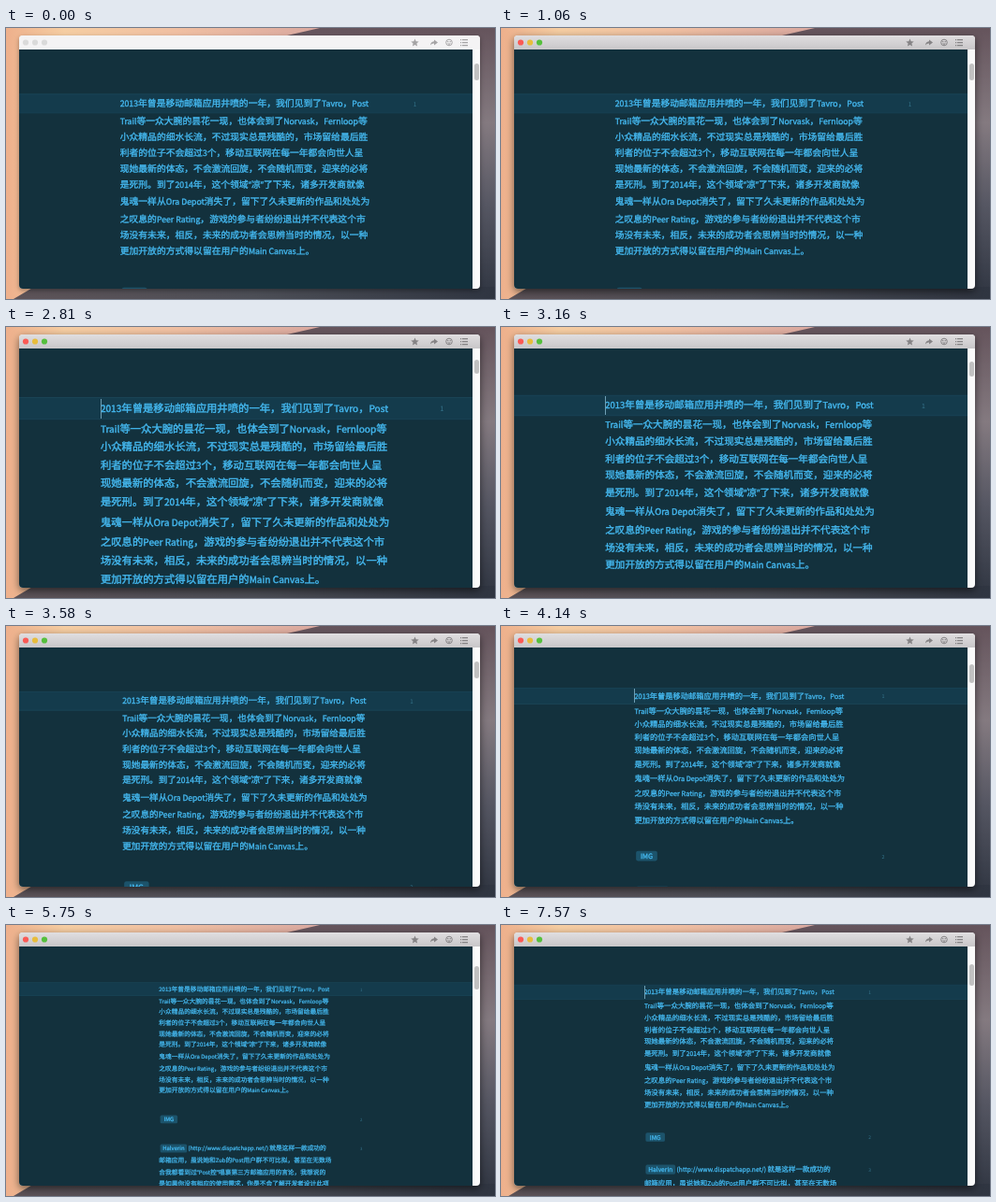
Recreate the animation shown at these times as an HTML page. Size 522 by 290 pixels, loop 8000 ms.

```html
<!DOCTYPE html>
<html lang="zh-CN">
<head>
<meta charset="utf-8">
<title>Text zoom</title>
<style>
html, body { margin: 0; width: 100%; height: 100%; overflow: hidden; background: #e9b993; }
#stage { position: absolute; left: 0; top: 0; width: 522px; height: 290px; overflow: hidden; }
#stage > svg { position: absolute; left: 0; top: 0; }
#win { position: absolute; left: 14px; top: 8px; width: 492px; height: 271px; border-radius: 4px;
  background: #fafafa; box-shadow: 0 3px 9px rgba(0,0,0,.55); }
#bar { position: absolute; left: 0; top: 0; width: 492px; height: 15px; border-radius: 4px 4px 0 0;
  background: linear-gradient(#e0dee0, #c8c6c8); }
#bar svg { position: absolute; left: 0; top: 0; }
.idle #win { box-shadow: 0 2px 5px rgba(0,0,0,.35); }
.idle #bar { background: #f4f3f4; }
.idle .light { fill: #dadada; }
.idle .icons { opacity: .7; }
#page { position: absolute; left: 0; top: 15px; width: 484px; height: 256px; overflow: hidden;
  background: #13313d; border-radius: 0 0 0 4px; }
#zoom { position: absolute; left: 240.2px; top: 19px; width: 0; height: 0; transform-origin: 0 0;
  font: 500 20px/40px "Noto Sans CJK SC", "Noto Sans CJK", sans-serif; color: #45baf2;
  text-rendering: geometricPrecision; }
#band { position: absolute; left: -800px; width: 1600px; top: 58.4px; height: 42.6px;
  background: #143b4c; box-shadow: inset 0 0 0 1.5px #1b4658; }
.line { position: absolute; left: -270px; white-space: pre; -webkit-text-stroke: .7px; }
.line span { font-size: 17.8px; line-height: 0; }
.line i { font: 500 19px/0 "Open Sans", sans-serif; }
.line b { display: inline-block; margin-left: 4px; padding: 0 7.5px; border-radius: 5px;
  font-weight: 500; line-height: 26.4px; background: #1c536b; }
.num { position: absolute; left: 369px; font-size: 13px; color: #35748c; }
#caret { position: absolute; width: 1px; background: #6f9fb4; }
#thumb { position: absolute; left: 486px; width: 5px; border-radius: 2.5px; background: #c1c1c1; }
</style>
</head>
<body>
<div id="stage">
  <svg width="522" height="290">
    <defs>
      <linearGradient id="sky">
        <stop offset="0" stop-color="#eeb08c"/><stop offset=".12" stop-color="#f5cda2"/>
        <stop offset=".35" stop-color="#f0bfa2"/><stop offset=".65" stop-color="#d9a8a0"/>
      </linearGradient>
      <linearGradient id="rock" x2="0" y2="1">
        <stop offset="0" stop-color="#65545c"/><stop offset=".35" stop-color="#847a80"/>
        <stop offset=".65" stop-color="#565763"/><stop offset="1" stop-color="#2f3541"/>
      </linearGradient>
      <linearGradient id="hills">
        <stop offset="0" stop-color="#5d5358"/><stop offset=".5" stop-color="#4c4e56"/>
        <stop offset="1" stop-color="#2f3541"/>
      </linearGradient>
    </defs>
    <path d="M0 0H522V290H0z" fill="url(#sky)"/>
    <path d="M300 8L335 0H522V290H420z" fill="url(#rock)"/>
    <path d="M8 290L30 277H522V290z" fill="url(#hills)"/>
  </svg>
  <div id="win">
    <div id="bar">
      <svg width="492" height="15">
        <g class="lights">
          <circle class="light" cx="7" cy="7.5" r="3.1" fill="#fa5a55"/>
          <circle class="light" cx="17" cy="7.5" r="3.1" fill="#e8bd3c"/>
          <circle class="light" cx="27" cy="7.5" r="3.1" fill="#55c03d"/>
        </g>
        <g class="icons" fill="#858385">
          <path d="M422.500 3.500l1.200 2.800 3 .3-2.300 2 .7 3-2.600-1.600-2.600 1.600.7-3-2.300-2 3-.3z"/>
          <path d="M443 4.500l4 3-4 3v-1.900q-2.500-.2-4 1.900.3-4 4-4.300z"/>
          <circle cx="459" cy="7.500" r="3.300" fill="none" stroke="#858385"/>
          <path d="M457.200 6h1.200v1.200h-1.200zm2.400 0h1.200v1.200h-1.200zM457 8.500h4l-2 1.600z"/>
          <path d="M471 4h1.200v1.200H471zm2 0h6v1.200h-6zM471 7h1.200v1.200H471zm2 0h6v1.200h-6zM471 10h1.200v1.200H471zm2 0h6v1.200h-6z"/>
        </g>
      </svg>
    </div>
    <div id="page">
      <div id="zoom"><div id="band"></div></div>
      <div id="caret"></div>
    </div>
    <div id="thumb"></div>
  </div>
</div>
<script>
const $ = id => document.getElementById(id);
const MID = 254.2, TOP = 42;                          // fixed point of the zoom on the stage
const FIRST = 3.97, GAP = 1.73, TALL = 1.91, PARA = 4.62;  // line distances in em
const FRAME = 70;

const paragraphs = [
  `2013年曾是移动邮箱应用井喷的一年，我们见到了Tavro，Post
Trail等一众大腕的昙花一现，也体会到了Norvask，Fernloop等
小众精品的细水长流，不过现实总是残酷的，市场留给最后胜
利者的位子不会超过3个，移动互联网在每一年都会向世人呈
现她最新的体态，不会激流回旋，不会随机而变，迎来的必将
是死刑。到了2014年，这个领域“凉”了下来，诸多开发商就像
鬼魂一样从Ora Depot消失了，留下了久未更新的作品和处处为
之叹息的Peer Rating，游戏的参与者纷纷退出并不代表这个市
场没有未来，相反，未来的成功者会思辨当时的情况，以一种
更加开放的方式得以留在用户的Main Canvas上。`,
  '[ IMG ]',
  `[Halverin] (http://www.dispatchapp.net/) 就是这样一款成功的
邮箱应用，虽说她和Zub的Post用户群不可比拟，甚至在无数场
合我都看到过“Post控”唱衰第三方邮箱应用的言论，我想说的
是如果你没有相应的使用需求，你是不会了解开发者设计此项`
];

function add(cls, y, html) {
  const el = document.createElement('div');
  el.className = cls;
  el.style.top = y * 20 - 21 + 'px';
  el.innerHTML = html;
  $('zoom').append(el);
}

const markUp = text => text
  .replace(/[ -~]+/g, '<span>$&</span>')
  .replace(/\[(.+?)\]/g, '<b>$1</b>')
  .replace(/[“”]/g, '<i>$&</i>');

let y = FIRST;
paragraphs.forEach((paragraph, p) => {
  if (p) y += PARA;
  add('num', y + .1, p + 1);
  paragraph.split('\n').forEach((text, i, all) => {
    // Latin words make a line taller, except at the end of a paragraph
    if (i) y += /[A-Z]/.test(text) && i < all.length - 1 ? TALL : GAP;
    add('line', y, markUp(text));
  });
});

// start, duration in ms, change of size in steps
const zooms = [
  [1900, 70, 1], [2530, 280, 1], [3020, 140, -1], [3370, 350, -2],
  [4000, 140, -1], [4350, 140, -1], [4770, 630, -1], [6380, 70, 1]
];

function sizeAt(t) {
  let level = 0;
  for (const [start, length, steps] of zooms)
    if (t >= start) level += steps * Math.min(1, (t - start + 20) / (length + 20));
  return 9.8 + .77 * level;
}

function draw(now) {
  const t = 10 + FRAME * Math.floor((now % 8000 - 10) / FRAME);
  const size = sizeAt(t);
  const active = t >= 500;
  const caretOn = active && (t - 450) % 1180 < 560;

  $('stage').className = active ? '' : 'idle';
  $('zoom').style.transform = `scale(${size / 20})`;

  const caret = $('caret').style;
  caret.visibility = caretOn ? 'visible' : 'hidden';
  caret.left = Math.floor(MID - 13.5 * size + .1) - 14 + 'px';
  caret.top = Math.round(TOP + 3.05 * size) - 23 + 'px';
  caret.height = Math.round(1.86 * size) + 'px';

  $('thumb').style.top = 35.5 - (size - 6.75) * 1.75 + 'px';
  $('thumb').style.height = 170 / size + 'px';
}

function tick() {
  draw(performance.now());
  requestAnimationFrame(tick);
}
tick();
</script>
</body>
</html>
```
